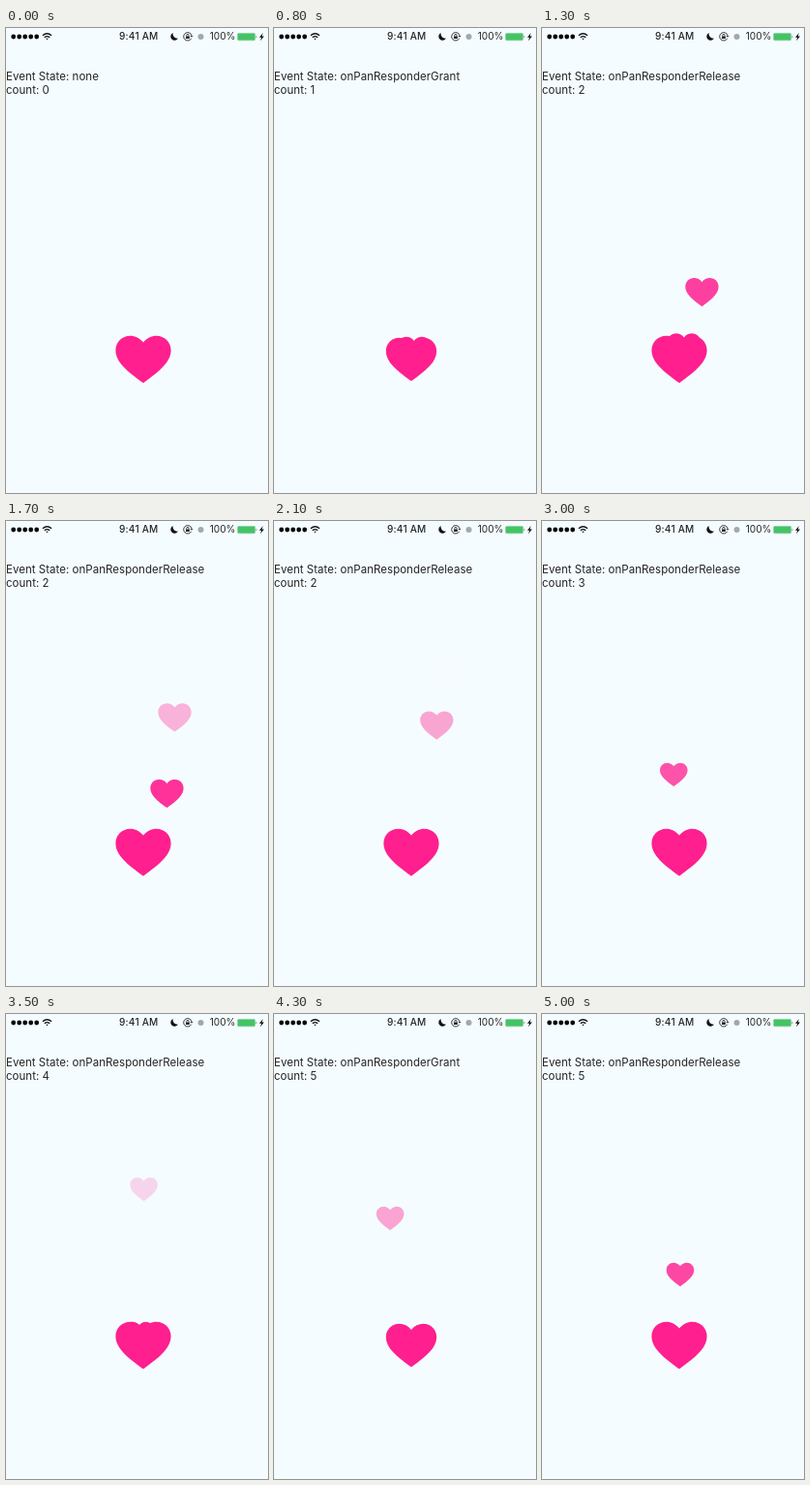
An HTML page for the animation above (5100 ms loop, 271x480 px).

```html
<!DOCTYPE html>
<html lang="en">
<head>
<meta charset="utf-8">
<title>Floating hearts</title>
<style>
  html, body { margin: 0; height: 100%; overflow: hidden; background: #f5fcff; }
  svg { display: block; width: 271px; height: 480px; }
  text { font: 11.5px Inter, Roboto, sans-serif; letter-spacing: .03px; fill: #242424; }
  .bar { font-size: 10.1px; }
  .clock { font-weight: 500; letter-spacing: .2px; }
</style>
</head>
<body>
<svg viewBox="0 0 271 480">
  <defs>
    <path id="heart" fill="#ff1f8f" d="M0-17.5C-3.5-22-8.5-24.4-13.5-24.4C-22-24.4-28.6-17.8-28.6-9.5C-28.6 3-16.8 12.2 0 24.5C16.8 12.2 28.6 3 28.6-9.5C28.6-17.8 22-24.4 13.5-24.4C8.5-24.4 3.5-22 0-17.5Z"/>
  </defs>

  <!-- status bar -->
  <path d="M7.7 9h24.1" stroke="#050505" stroke-width="4.8" stroke-linecap="round" stroke-dasharray="0 6"/>
  <g fill="none" stroke="#111" stroke-width="1.3">
    <path d="M37.9 7.8Q42.5 3.6 47.1 7.8M39.8 9.8Q42.5 7.4 45.2 9.8"/>
    <path d="M41.2 10.8h2.6L42.5 12.3Z" fill="#111" stroke="none"/>
  </g>
  <text class="bar clock" x="117" y="12.4">9:41 AM</text>
  <path d="M172.6 5A4.1 4.1 0 1 0 178 10.6A4.6 4.6 0 0 1 172.6 5Z" fill="#111"/>
  <g fill="none" stroke="#222" stroke-width=".9">
    <path d="M191.6 10.8A4.2 4.2 0 1 1 192 7.8"/>
    <path d="M186.8 8.5v-1a1.1 1.1 0 0 1 2.2 0v1"/>
    <path d="M186 8.4h3.8v2.7h-3.8zM190.5 8h3l-1.5 1.6z" fill="#222" stroke="none"/>
  </g>
  <circle cx="201.5" cy="9" r="3" fill="#a3a8ab"/>
  <text class="bar" x="210.7" y="12.4">100%</text>
  <rect x="239.6" y="5.4" width="18" height="7.4" rx="1.2" fill="#43c464" stroke="#8fc9a0" stroke-width=".7"/>
  <path d="M258.7 7.7q1.4 1.3 0 2.8z" fill="#222"/>
  <path d="M265.8 5L262 9.7h2.2L263 13.2L267 8.4h-2.3Z" fill="#111"/>

  <text id="state" x="0" y="53.6"></text>
  <text id="count" x="0" y="68"></text>
  <g id="floats"></g>
  <use id="big" href="#heart"/>
</svg>
<script>
const LOOP = 5100, STEP = 100, HOLD = 200, RISE = 1717;
const START = { x: 142, y: 342 }, END_Y = 150, TURN = 0.4;

// press: finger down, rise: heart takes off, quick: released before a redraw
const taps = [
  { press: 700, rise: 590, size: 0.6, peak: 168, end: 180 },
  { press: 1100, rise: 1043, size: 0.6, peak: 173, end: 163 },
  { press: 2300, rise: 2227, size: 0.5, peak: 136, end: 145, quick: true },
  { press: 3300, rise: 3243, size: 0.5, peak: 115, end: 126 },
  { press: 4300, rise: 4268, size: 0.5, peak: 143, end: 143 }
];

const $ = id => document.getElementById(id);
const clamp = v => Math.max(0, Math.min(1, v));
const mix = (a, b, k) => a + (b - a) * k;
const ease = k => k < 0.5 ? (2 * k) ** 1.72 / 2 : 1 - (2 - 2 * k) ** 1.72 / 2;

function place(el, x, y, scale) {
  el.setAttribute('transform', `translate(${x} ${y}) scale(${scale})`);
}

for (const tap of taps) {
  tap.el = document.createElementNS('http://www.w3.org/2000/svg', 'use');
  tap.el.setAttribute('href', '#heart');
  $('floats').append(tap.el);
}

function draw(t) {
  for (const { el, rise, size, peak, end } of taps) {
    const age = (t - rise) / RISE;
    const p = ease(clamp(age));
    const x = p < TURN ? mix(START.x, peak, p / TURN)
                       : mix(peak, end, (p - TURN) / (1 - TURN));
    el.setAttribute('opacity', age > 0 ? clamp(1.42 * (0.96 - p)) : 0);
    place(el, x, mix(START.y, END_Y, p), size);
  }

  const done = taps.filter(tap => t >= tap.press);
  const last = done[done.length - 1];
  const pressed = last && t < last.press + HOLD;
  const event = !last ? 'none'
    : 'onPanResponder' + (pressed && !last.quick ? 'Grant' : 'Release');
  $('state').textContent = 'Event State: ' + event;
  $('count').textContent = 'count: ' + done.length;
  place($('big'), START.x, START.y + 0.1, pressed ? 0.915 : 1);
}

const begin = performance.now();
function tick() {
  const t = (performance.now() - begin) % LOOP;
  draw(Math.floor(t / STEP) * STEP);
  requestAnimationFrame(tick);
}
tick();
</script>
</body>
</html>
```
